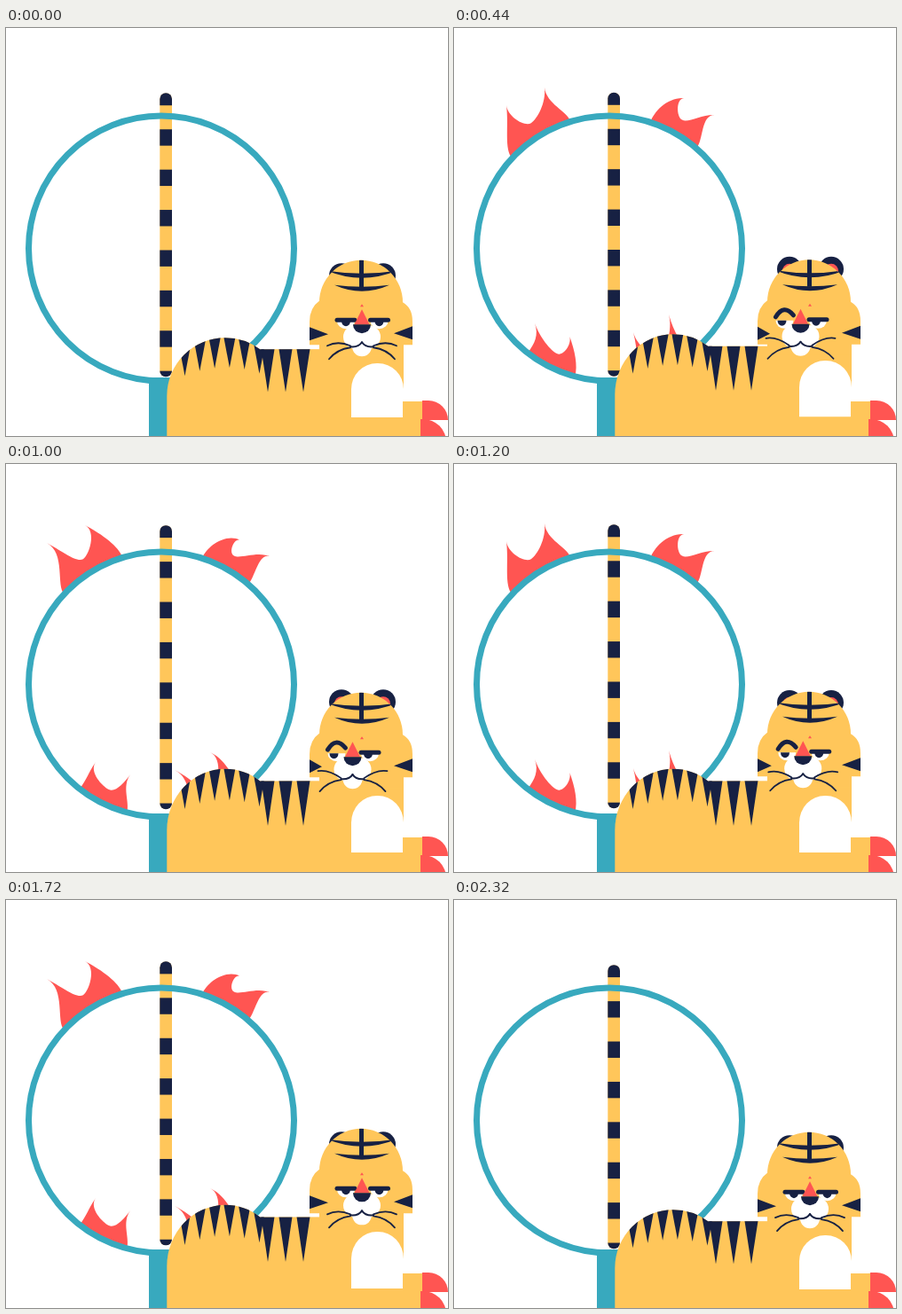
Write an HTML page with a canvas that moves like this. It is 498 px wide and 460 px high and loops after 2360 ms.

```html
<!DOCTYPE html>
<html lang="en">
<head>
<meta charset="utf-8">
<title>Tiger and ring of fire</title>
<style>
  html, body { margin: 0; width: 100%; height: 100%; overflow: hidden; background: #fff; }
  canvas { display: block; }
</style>
</head>
<body>
<canvas id="stage" width="498" height="460"></canvas>
<script>
const ctx = document.getElementById('stage').getContext('2d');
const LOOP = 2360, STEP = 40, FLICKER = 240;
const YELLOW = '#ffc65a', NAVY = '#172143', RED = '#ff5552', TEAL = '#38a9be', WHITE = '#fff';
const TAU = Math.PI * 2, DEG = Math.PI / 180;
const RING = { x: 175, y: 248.5, r: 149.5 };

// ends: degrees on the ring; side: 1 outside, -1 inside; heading: where tips point; turn: added when bent.
const flames = [
  { ends: [223, 253], side: 1, tips: [[59, 87], [102, 67]], sway: [-13, 2], heading: -97, turn: -55, born: 210, fade: 1730 },
  { ends: [288, 311], side: 1, tips: [[260, 79], [295, 98]], sway: [4, 7], heading: 5, turn: 22, born: 140, fade: 1800 },
  { ends: [128, 105], side: -1, tips: [[91, 333], [130, 347]], sway: [10, 3], heading: -110, turn: 55, born: 20, fade: 1860 },
  { ends: [77, 53], side: -1, tips: [[202, 343], [242, 323]], sway: [-12, 2], heading: -105, turn: -50, born: 220, fade: 1900 }
];

const mix = (a, b, k) => a + (b - a) * k;
const ease = (t, from, to) => {
  const k = Math.min(1, Math.max(0, (t - from) / (to - from)));
  return k * k * (3 - 2 * k);
};
const pulse = (t, a, b, c, d) => ease(t, a, b) * (1 - ease(t, c, d));
const move = ([x, y], angle, d) => [x + Math.cos(angle) * d, y + Math.sin(angle) * d];
const onRing = (angle, lift = 0) => move([RING.x, RING.y], angle, RING.r + lift);

function rect(color, x0, y0, x1, y1) {
  ctx.fillStyle = color;
  ctx.fillRect(x0, y0, x1 - x0, y1 - y0);
}

function bar(color, x0, y0, x1, y1, radii) {
  ctx.fillStyle = color;
  ctx.beginPath();
  ctx.roundRect(x0, y0, x1 - x0, y1 - y0, radii);
  ctx.fill();
}

function oval(color, x, y, rx, ry = rx, from = 0, to = TAU) {
  ctx.fillStyle = color;
  ctx.beginPath();
  ctx.ellipse(x, y, rx, ry, 0, from, to);
  ctx.fill();
}

function triangle(color, x0, y0, x1, y1, x2, y2) {
  ctx.fillStyle = color;
  ctx.beginPath();
  ctx.moveTo(x0, y0);
  ctx.lineTo(x1, y1);
  ctx.lineTo(x2, y2);
  ctx.fill();
}

function curve(width, x0, y0, cx, cy, x1, y1) {
  ctx.strokeStyle = NAVY;
  ctx.lineWidth = width;
  ctx.lineCap = 'round';
  ctx.beginPath();
  ctx.moveTo(x0, y0);
  ctx.quadraticCurveTo(cx, cy, x1, y1);
  ctx.stroke();
}

function group(draw) {
  ctx.save();
  draw();
  ctx.restore();
}

// Two tongues rising from the ring, with a round valley between them.
function drawFlame({ ends, side, tips, sway, heading, turn, born, fade }, t) {
  const size = pulse(t, born, born + 220, fade, fade + 260);
  if (size < 0.01) return;
  const bend = 1 + Math.cos(TAU * (t - 100) / FLICKER) / 0.87;
  const [a, b] = ends.map(d => d * DEG), mid = (a + b) / 2;
  const start = onRing(a), end = onRing(b), valley = onRing(mid, 17 * side);
  const along = Math.atan2(end[1] - start[1], end[0] - start[0]);
  const point = (heading + turn * bend) * DEG;
  const [left, right] = tips.map(([x, y]) => [x + sway[0] * bend, y + sway[1] * bend]);
  const nearTip = (tip, base) => move(tip, point, -0.4 * Math.hypot(tip[0] - base[0], tip[1] - base[1]));
  const to = (...points) => ctx.bezierCurveTo(...points.flat());
  const pivot = onRing(mid);
  group(() => {
    ctx.translate(...pivot);
    ctx.scale(size, size);
    ctx.translate(-pivot[0], -pivot[1]);
    ctx.fillStyle = RED;
    ctx.beginPath();
    ctx.moveTo(...start);
    to(move(start, a, 13 * side), nearTip(left, start), left);
    to(nearTip(left, valley), move(valley, along, -8), valley);
    to(move(valley, along, 8), nearTip(right, valley), right);
    to(nearTip(right, end), move(end, b, 13 * side), end);
    ctx.arc(RING.x, RING.y, RING.r, b, a, b > a);
    ctx.fill();
  });
}

function drawTail(dy) {
  group(() => {
    ctx.translate(0, dy);
    ctx.beginPath();
    ctx.roundRect(173.3, 72, 13.7, 320, 6.8);
    ctx.clip();
    rect(YELLOW, 173, 72, 187, 392);
    for (let y = 67.6; y < 392; y += 45.4) rect(NAVY, 173, y, 187, y + 18.4);
  });
}

function drawRing() {
  ctx.strokeStyle = TEAL;
  ctx.lineWidth = 7;
  ctx.beginPath();
  ctx.arc(RING.x, RING.y, RING.r, 0, TAU);
  ctx.stroke();
  rect(TEAL, 161, 394, 183, 460);
}

function drawBody(stretch) {
  group(() => {
    ctx.translate(0, 460);
    ctx.scale(1, stretch);
    ctx.translate(0, -460);
    group(() => {
      ctx.beginPath();
      ctx.moveTo(181.3, 460);
      ctx.arc(247, 415, 65.7, Math.PI, -0.93);
      ctx.lineTo(448, 362);
      ctx.lineTo(448, 460);
      ctx.closePath();
      ctx.clip();
      rect(YELLOW, 181, 340, 448, 460);
      for (let x = 201.5; x < 290; x += 16.8) {
        const tip = 383 + 0.0045 * (x - 247) ** 2, half = (tip - 340) * 0.19;
        triangle(NAVY, x - half, 340, x + half, 340, x, tip);
      }
      for (let x = 295; x < 340; x += 20) triangle(NAVY, x - 7.5, 362, x + 7.5, 362, x, 410.5);
    });
    bar(WHITE, 389, 378, 448, 439, [29, 29, 0, 0]);
  });
  rect(YELLOW, 447, 421, 469, 460);
  bar(RED, 469, 420, 498, 442, [0, 22, 0, 0]);
  bar(RED, 467, 441, 496, 470, [0, 26, 0, 0]);
}

function drawEar(x, up) {
  const y = 278 - 7 * up;
  oval(NAVY, x, y, 14);
  oval(RED, x, y + 2, 8);
}

function crescent(half, y, dip, inner) {
  ctx.fillStyle = NAVY;
  ctx.beginPath();
  ctx.moveTo(401 - half, y);
  ctx.quadraticCurveTo(401, y + dip, 401 + half, y);
  ctx.quadraticCurveTo(401, y + inner, 401 - half, y);
  ctx.fill();
}

function drawEye(x, look, raised) {
  oval(WHITE, x, 329, 10, 9, 0, Math.PI);
  oval(NAVY, x + look, 329, 5, 6, 0, Math.PI);
  const y = mix(328, 325, raised);
  curve(5, x - 10, y, x - 1, mix(328, 310, raised), x + 10, mix(328, 323, raised));
}

function drawSkull(turn) {
  ctx.beginPath();
  ctx.moveTo(342, 356);
  ctx.lineTo(342, 330);
  ctx.quadraticCurveTo(342, 314, 353.5, 306);
  ctx.ellipse(400, 308, 47, 47.5, 0, Math.PI, 0);
  ctx.quadraticCurveTo(458, 314, 458, 330);
  ctx.lineTo(458, 356);
  ctx.lineTo(448, 356);
  ctx.lineTo(448, 368);
  ctx.lineTo(353, 368);
  ctx.lineTo(353, 356);
  ctx.closePath();
  ctx.fillStyle = YELLOW;
  ctx.fill();
  ctx.clip();
  rect(NAVY, 398, 260, 403, 291);
  crescent(39, 272.5, 16, 6);
  crescent(31, 288.5, 14, 4);
  triangle(NAVY, 342, 336, 342, 351, mix(363, 356, turn), 344);
  triangle(NAVY, 458, 335, 458, 350, 437, 343);
}

function drawFace(turn, brow) {
  drawEye(383, -3 * turn, brow);
  drawEye(420.5, -2 * turn, 0);
  for (const x of [393, 409]) oval(WHITE, x, 347, 13);
  oval(WHITE, 401, 358, 11);
  triangle(RED, 401, 316, 392.5, 333, 409.5, 333);
  oval(NAVY, 401, 333, 10, 10, 0, Math.PI);
  const lift = 8 * turn;
  for (const side of [-1, 1]) {
    const x = d => 401 + side * d;
    curve(1.8, x(39), 357 - lift, x(27), 351 - lift / 2, x(13), 357);
    curve(1.8, x(37), 372, x(28), 361, x(13), 359);
    curve(2, x(0), 353, x(4), 359, x(13), 358);
  }
}

function drawHead(dy, turn, brow) {
  group(() => {
    ctx.translate(0, dy);
    drawEar(378, turn);
    drawEar(425, turn);
    group(() => drawSkull(turn));
    triangle(RED, 399, 313, 403, 313, 401, 310);
    ctx.translate(-10.5 * turn, 0);
    drawFace(turn, brow);
  });
}

function draw(now) {
  const t = Math.floor(now % LOOP / STEP) * STEP;
  const dy = -1.2 + 2.7 * Math.cos(TAU * (t - 160) / LOOP);
  rect(WHITE, 0, 0, 498, 460);
  flames.forEach(flame => drawFlame(flame, t));
  drawTail(dy);
  drawRing();
  drawBody(1 + 0.05 * pulse(t, 60, 640, 1680, 2300));
  drawHead(dy, pulse(t, 20, 200, 1120, 1360), pulse(t, 20, 200, 1460, 1640));
}

let start;
function tick(now) {
  start ??= now;
  draw(now - start);
  requestAnimationFrame(tick);
}
draw(0);
requestAnimationFrame(tick);
</script>
</body>
</html>
```
